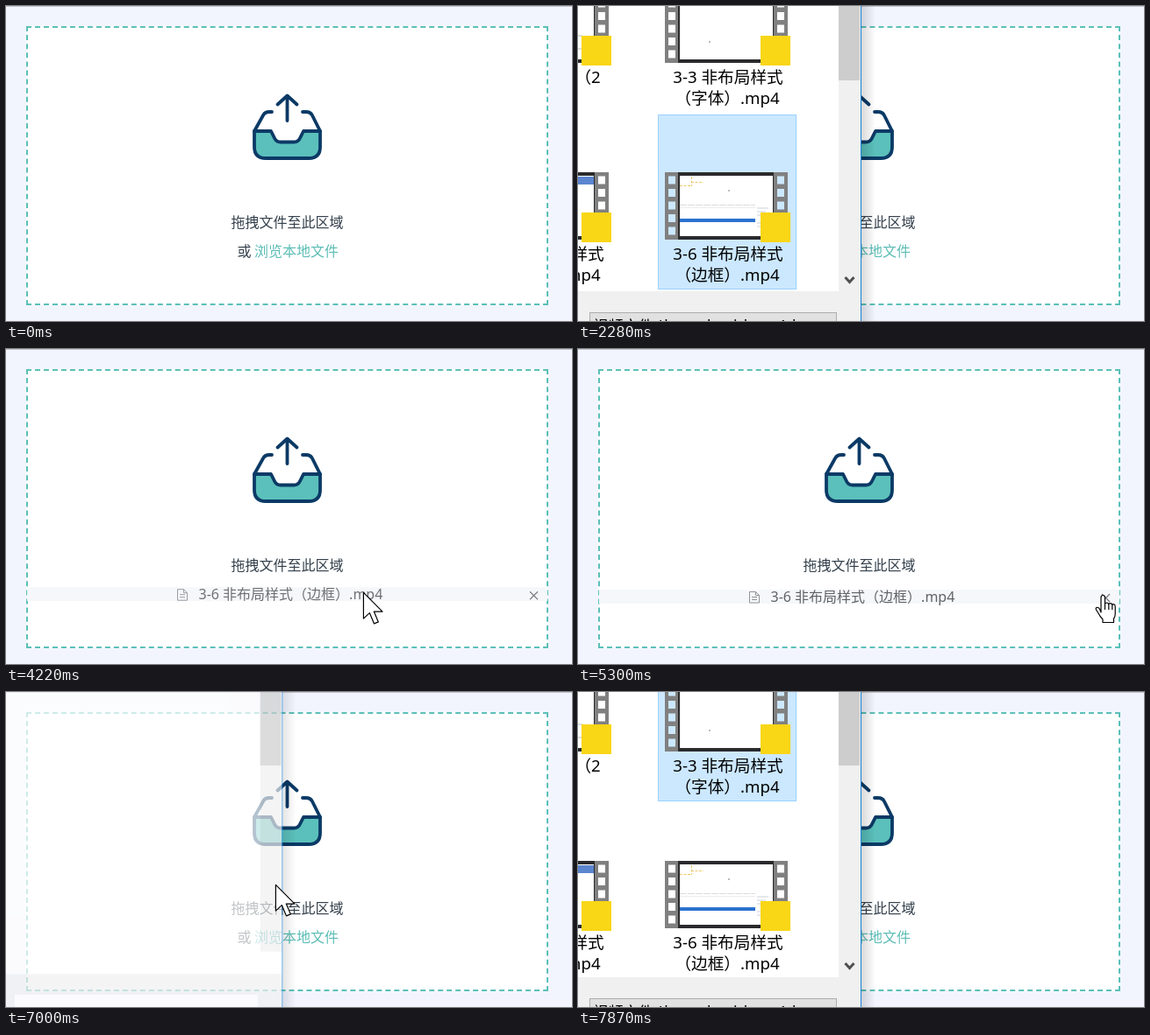
An HTML page for the animation above (8 s loop, 645 by 360 pixels).

```html
<!DOCTYPE html>
<html lang="zh-CN">
<head>
<meta charset="utf-8">
<title>文件上传</title>
<style>
html, body { margin: 0; width: 100%; height: 100%; overflow: hidden; background: #f2f5fe; }
.drop { position: absolute; left: 23px; top: 23px; width: 595px; height: 319px; box-sizing: border-box; border: 2px dashed #5bc0b8; background: #fff; }
svg { position: absolute; left: 0; top: 0; }
text { font: 16px "Noto Sans", "Noto Sans CJK SC", "Noto Sans CJK JP", sans-serif; }
#dialog text { font-size: 18.67px; }
#dialog .filter { font-size: 17.3px; }
.line { fill: none; stroke: #0b3a66; stroke-width: 3.8; stroke-linecap: round; stroke-linejoin: round; }
.cursor { fill: #fff; stroke: #000; stroke-width: 1.2; stroke-linejoin: round; }
</style>
</head>
<body>
<div class="drop"></div>
<svg width="645" height="360" viewBox="0 0 645 360">
  <defs>
    <linearGradient id="shade">
      <stop offset="0" stop-opacity=".15"/><stop offset="1" stop-opacity="0"/>
    </linearGradient>
  </defs>
  <rect width="645" height="1" fill="#c3c6ce"/>

  <g class="line">
    <path d="M320.5 131V103M309.5 112.500L320.500 102.500L331.500 112.500"/>
    <path d="M303 121h-3q-5 0-7 4L283 143M338 121h4q5 0 7 4L358 143"/>
    <path fill="#5bc0bb" d="M283 143H302L306 151q2 4.500 7 4.500H328q5 0 7-4.500L339 143H358V161q0 13-13 13H296q-13 0-13-13Z"/>
  </g>
  <text x="320.5" y="253" text-anchor="middle" fill="#34404c">拖拽文件至此区域</text>
  <g id="link">
    <text x="263.5" y="286" fill="#34404c">或</text>
    <text x="283" y="286" fill="#5bbdb6">浏览本地文件</text>
  </g>

  <g id="row">
    <g id="rowHover">
      <rect x="24" y="275" width="593" height="16" fill="#f5f7fa"/>
      <path d="M597 280l9 9m0-9l-9 9" stroke="#707378" stroke-width="1.2"/>
    </g>
    <path d="M195.500 277.500h7l4 4v8.500h-11zM202.500 277.500v4h4M198 283.500h6M198 286.500h6" fill="none" stroke="#909399"/>
    <text x="219.5" y="289" fill="#606266">3-6 非布局样式（边框）.mp4</text>
  </g>

  <g id="dialog">
    <rect x="323" y="-100" width="16" height="600" fill="url(#shade)"/>
    <rect x="-300" y="-100" width="622" height="600" fill="#fff"/>
    <g id="files"></g>
    <rect x="-300" y="326" width="622" height="174" fill="#f0f0f0"/>
    <rect x="13" y="350" width="281" height="32" fill="#fff"/>
    <rect x="297" y="-100" width="25" height="400" fill="#f0f0f0"/>
    <rect id="thumb" x="297" y="-100" width="24" height="184" fill="#cdcdcd"/>
    <g id="controls">
      <rect x="297" y="300" width="25" height="26" fill="#f0f0f0"/>
      <path d="M304.500 310l5 5.500l5-5.500" fill="none" stroke="#505050" stroke-width="3"/>
      <rect x="13.5" y="350.5" width="281" height="32" fill="#e1e1e1" stroke="#adadad"/>
      <text class="filter" x="17" y="372">视频文件 (*.ogv;*.avi;*.mp4;*.n</text>
      <path d="M276 363l4.500 5l4.500-5" fill="none" stroke="#505050" stroke-width="1.5"/>
    </g>
    <rect x="322" y="-100" width="1" height="600" fill="#1883d7"/>
  </g>

  <path id="arrow" class="cursor" d="M.6.8V30.500L7.500 24L12.700 36.300L17.500 34.300L12.500 22.500H22.200Z"/>
  <path id="hand" class="cursor" d="M-2 20V3q0-2.500 2.200-2.500T2.500 3V11q0-2 2-2t2.300 2.500q0-2 2-1.800t2 2.300q0-1.500 1.700-1.300t1.700 2.500V22q0 3-1.700 5V31.500H0V28q-3-3-5-7l-2.500-4q-1-2 1-2.700q1.700-.300 3 2ZM2.500 10v7M6.800 11v6M10.800 12v5"/>
</svg>
<script>
const $ = id => document.getElementById(id);
const LOOP = 8000;

// Film thumbnails with their captions
const FILM = "M0 0H16V77H0ZM124 0H140V77H124Z" + [0, 1, 2, 3, 4].map(i =>
  [4, 128].map(x => `M${x} ${4.5 + i * 14.5}h8v9h-8z`).join("")).join("");
const editor = `<path d="M29 15.500h-12M30.500 5v11M30 11.500h14" fill="none" stroke="#ecc867" stroke-dasharray="3 1.500"/>
  <path d="M17 37.500h86" stroke="#dcdcdc" stroke-dasharray="8 1"/>
  <path d="M17 40.500h86" stroke="#ececec"/>
  <path d="M17 55h86" stroke="#2b72cf" stroke-width="4"/>
  <path d="M105 41h13M105 45h10M105 49h14M105 58h12M105 62h9" stroke="#ccd0da"/>
  <circle cx="73" cy="21" r=".8" fill="#666"/>`;
const plain = `<circle cx="51" cy="53" r=".8" fill="#666"/>`;
const page = `<path d="M17 9.500h106" stroke="#5b85cf" stroke-width="9"/>`;
const sketch = `<path d="M100 46h10M105 61h12" stroke="#bbb"/>`;

const items = [
  [-105, -9, "3-2 选择器（2", "）.mp4", sketch],
  [99, -9, "3-3 非布局样式", "（字体）.mp4", plain],
  [-105, 193, "3-5 非布局样式", "（背景）.mp4", page],
  [99, 193, "3-6 非布局样式", "（边框）.mp4", editor]
];
$("files").innerHTML = items.map(([x, y, name, rest, art]) => `
  <g transform="translate(${x} ${y})">
    <rect class="mark" x="-7.500" y="-65.500" width="157" height="199"/>
    <path d="${FILM}" fill="#808080" fill-rule="evenodd"/>
    <rect x="15" width="109" height="77" fill="#2a2a2c"/>
    <rect x="17" y="4" width="106" height="69" fill="#fff"/>${art}
    <rect x="109" y="46" width="34" height="34" fill="#f9d616"/>
    <text x="72" y="100" text-anchor="middle">${name}</text>
    <text x="71" y="124" text-anchor="middle">${rest}</text>
  </g>`).join("");
const marks = document.querySelectorAll(".mark");

// Pointer stops: time, x, y
const stops = [
  [150, 452, 366], [670, 341, 281], [1640, 341, 281], [1940, 222, 258],
  [2020, 222, 258], [2270, 262, 362], [2800, 264, 362], [3130, 217, 273],
  [3500, 217, 273], [4920, 588, 282], [5280, 598, 281], [5560, 598, 281],
  [6400, 361, 285], [6660, 355, 285], [6780, 355, 285], [7340, 215, 95],
  [7480, 215, 95], [7860, 220, 365]
];

const ramp = (t, from, to) => Math.min(1, Math.max(0, (t - from) / (to - from)));
const smooth = p => p * p * (3 - 2 * p);
const within = (t, from, to) => t >= from && t < to;
const show = (id, on) => $(id).style.display = on ? "" : "none";
const move = (id, x, y) => $(id).setAttribute("transform", `translate(${x} ${y})`);

function pointerAt(t) {
  const next = stops.findIndex(s => s[0] > t);
  if (next < 1) return (next ? stops[stops.length - 1] : stops[0]).slice(1);
  const [a, b] = [stops[next - 1], stops[next]];
  const p = smooth(ramp(t, a[0], b[0]));
  return [a[1] + (b[1] - a[1]) * p, a[2] + (b[2] - a[2]) * p];
}

function drawRow(t, y) {
  const enter = smooth(ramp(t, 3450, 4400));
  const leave = smooth(ramp(t, 5620, 6380));
  show("link", !within(t, 3380, 5620));
  show("row", within(t, 3450, 6380));
  show("rowHover", t < 5620 && y >= 275);
  $("row").style.opacity = enter * (1 - leave);
  move("row", 0, t < 5620 ? -30 * (1 - enter) : 28 - 30 * leave);
}

function drawDialog(t, x, y) {
  const open = t < 3230 ? ramp(t, 1000, 1280)
    : t < 6000 ? 1 - ramp(t, 3230, 3480) : ramp(t, 6800, 7090);
  const loaded = within(t, 1270, 3480) || t > 7080;
  const picked = within(t, 1950, 3480) ? 3 : t > 7430 ? 1 : -1;
  const scroll = picked === 3 ? 3 : 0;
  show("dialog", open > 0);
  show("files", loaded);
  show("controls", loaded);
  $("dialog").style.opacity = open;
  $("dialog").setAttribute("transform",
    `translate(-175 82) scale(${0.95 + 0.05 * open}) translate(175 -82)`);
  move("files", 0, -scroll);
  move("thumb", 0, scroll / 3);
  items.forEach(([left, top], i) => {
    const hover = within(x, left - 8, left + 150) && within(y + scroll, top - 66, top + 134) && y < 326;
    marks[i].setAttribute("fill", i === picked ? "#cce8ff" : hover ? "#e5f3ff" : "none");
    marks[i].setAttribute("stroke", i === picked ? "#99d1ff" : "none");
  });
}

function draw() {
  const t = performance.now() % LOOP;
  const [x, y] = pointerAt(t);
  const hand = within(t, 560, 820) || within(t, 4880, 5640) || within(t, 6340, 6690);
  drawRow(t, y);
  drawDialog(t, x, y);
  show("hand", hand);
  show("arrow", !hand);
  move(hand ? "hand" : "arrow", x, y);
  requestAnimationFrame(draw);
}
draw();
</script>
</body>
</html>
```
